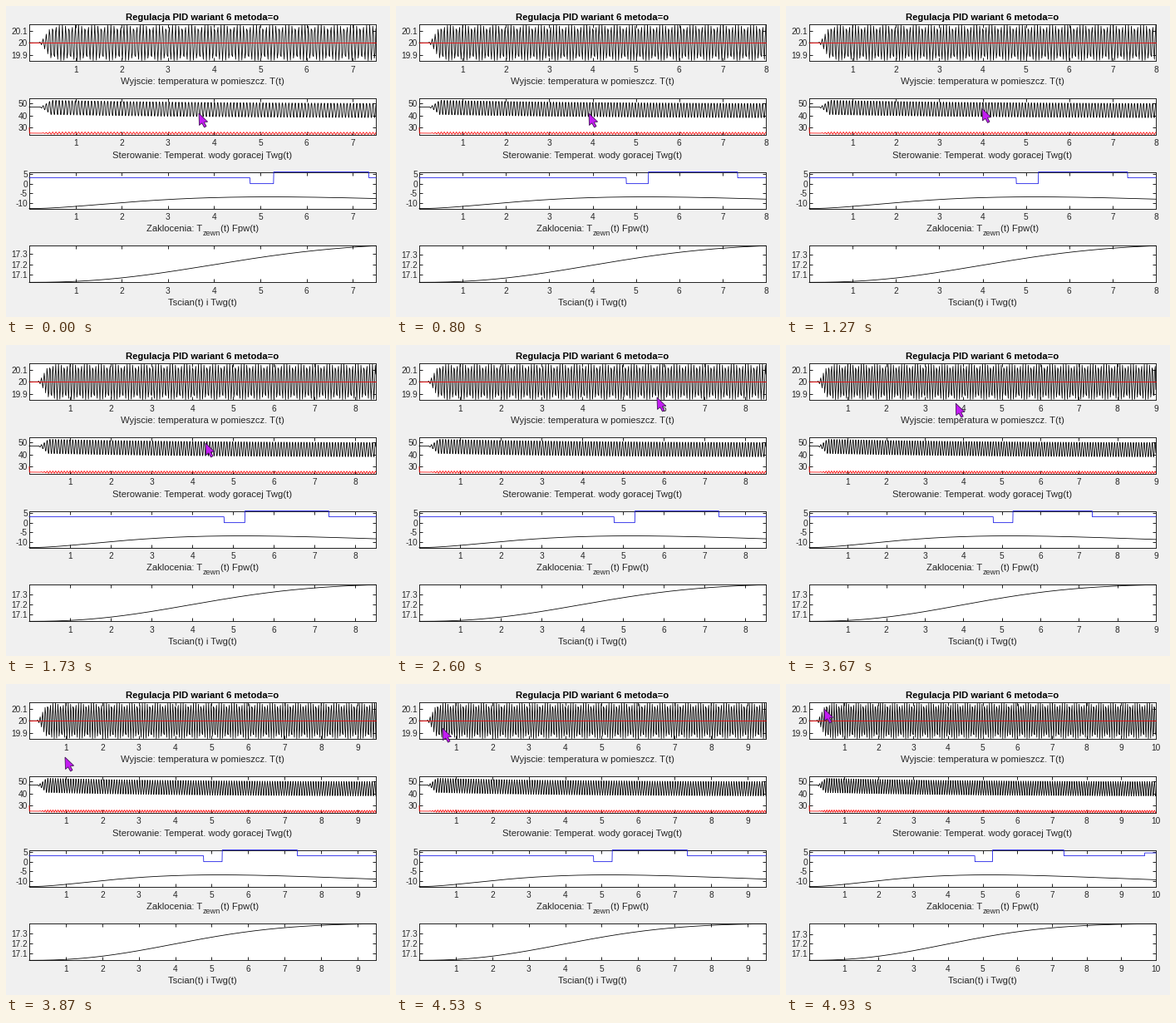
These frames come from a looping animation (462x374 px, 4990 ms). A matplotlib script:

```python
import numpy as np
import matplotlib.pyplot as plt
from matplotlib.animation import FuncAnimation
from matplotlib.patches import Polygon

W, H, DPI = 462, 374, 100
LOOP, FRAMES = 4990, 75
PX = 72 / DPI
INK = "#262626"
LEFT, RIGHT, TOP, HEIGHT, SPACING = 28, 445, 22.2, 44, 88.7

plt.rcParams.update({"font.family": "Liberation Sans", "axes.linewidth": PX})

# The time axis grows by half an hour at each of these moments (ms)
GROW_TIMES = [790, 1720, 2985, 3850, 4915]

# Pointer rests: arrival and departure in ms, then x, y
RESTS = [(0, 800, 232, 129), (1725, 1930, 240, 118), (2590, 2665, 314, 63),
         (2990, 3460, 340, 52), (3855, 3930, 71, 88), (4920, LOOP, 46, 30)]
ARROW = np.array([(0, 0), (0.5, 14.5), (3.7, 11.8), (6.6, 17), (9, 15.6),
                  (6.4, 10.8), (10.6, 10.2)])


def oscillation(t, period=0.07):
    return np.clip((t - 0.2) / 0.27, 0, 1) ** 1.5 * np.sin(2 * np.pi * t / period)


def outdoor(t):
    s = t / 5.2
    return -12.8 + 6 * (s * np.exp(1 - s)) ** 2


def wall(t):
    return 17.028 + 0.38 * (1 - np.exp(-(t / 5.05) ** 2.3))


# Minute samples give the room temperature its beating envelope
coarse = np.arange(601) / 60
fine = np.arange(2001) / 200

room = 20 + 0.148 * oscillation(coarse)
supply = 47.3 - 3.5 * (1 - np.exp(-fine / 4)) + 6 * oscillation(fine)
returned = 25.6 - 0.03 * fine + 0.9 * oscillation(fine)
returned[0] = 30
gains = np.array([3, 0, 6, 3, 4.5])[np.digitize(fine, [4.78, 5.29, 7.35, 9.68])]

# label, y range, y tick step, curves as (t, values, colour)
PANELS = [
    (["Wyjscie: temperatura w pomieszcz. T(t)"], (19.848, 20.152), 0.1,
     [(coarse, room, "black"), (coarse, np.full_like(coarse, 20), "red")]),
    (["Sterowanie: Temperat. wody goracej Twg(t)"], (24.2, 54.5), 10,
     [(fine, supply, "black"), (fine, returned, "red")]),
    (["Zaklocenia: T", "zewn", "(t) Fpw(t)"], (-12.8, 6), 5,
     [(fine, gains, "#1414e6"), (fine, outdoor(fine), "black")]),
    (["Tscian(t) i Twg(t)"], (17.028, 17.375), 0.1,
     [(fine, wall(fine), "black")]),
]

fig = plt.figure(figsize=(W / DPI, H / DPI), dpi=DPI, facecolor="#f0f0f0")


def caption(y, parts, **style):
    """Centre the parts as one line; every second part is a subscript."""
    texts = [fig.text(0, 1 - (y + 4.5 * (i % 2)) / H, part, va="baseline",
                      fontsize=(11.2 - 2 * (i % 2)) * PX, **style)
             for i, part in enumerate(parts)]
    widths = [text.get_window_extent().width for text in texts]
    x = (LEFT + RIGHT - sum(widths)) / 2
    for text, width in zip(texts, widths):
        text.set_x(x / W)
        x += width


def add_panel(index, label, limits, step, curves):
    bottom = TOP + SPACING * index + HEIGHT
    ax = fig.add_axes([LEFT / W, 1 - bottom / H, (RIGHT - LEFT) / W, HEIGHT / H])
    ax.set_ylim(limits)
    low, high = np.ceil(limits[0] / step), np.floor(limits[1] / step)
    ticks = np.arange(low, high + 1) * step
    ax.set_yticks(ticks, [f"{v:g}" for v in ticks])
    ax.tick_params(direction="in", top=True, right=True, length=4 * PX, width=PX,
                   color=INK, labelcolor=INK, labelsize=10.15 * PX)
    ax.tick_params(axis="x", pad=5.5 * PX)
    ax.tick_params(axis="y", pad=2.2 * PX)
    for spine in ax.spines.values():
        spine.set_color(INK)
    caption(bottom + 27.8, label, color=INK)
    lines = [(ax.plot([], [], color=c, lw=0.8 * PX, zorder=3, clip_on=False)[0], t, v)
             for t, v, c in curves]
    return ax, lines


panels = [add_panel(i, *panel) for i, panel in enumerate(PANELS)]
caption(16.8, ["Regulacja PID wariant 6 metoda=o"], weight="bold", color="black")

overlay = fig.add_axes([0, 0, 1, 1], xlim=(0, W), ylim=(H, 0), zorder=10)
overlay.axis("off")
pointer = overlay.add_patch(Polygon(ARROW, fc="#c31cf2", ec="#3c1450", lw=0.8 * PX))


def pointer_tip(now):
    times = [t for rest in RESTS for t in rest[:2]]
    return [np.interp(now, times, np.repeat([rest[k] for rest in RESTS], 2))
            for k in (2, 3)]


def update(frame):
    now = frame * LOOP / FRAMES
    hours = 7.5 + 0.5 * np.searchsorted(GROW_TIMES, now, side="right")
    for ax, lines in panels:
        ax.set_xlim(0, hours)
        ax.set_xticks(range(1, int(hours) + 1))
        for line, t, values in lines:
            shown = t <= hours + 1e-9
            line.set_data(t[shown], values[shown])
    panels[-1][0].set_ylim(wall(0), wall(hours))
    pointer.set_xy(ARROW + pointer_tip(now))


anim = FuncAnimation(fig, update, frames=FRAMES, interval=LOOP / FRAMES, repeat=True,
                     repeat_delay=0, init_func=lambda: update(0))
plt.show()
```
